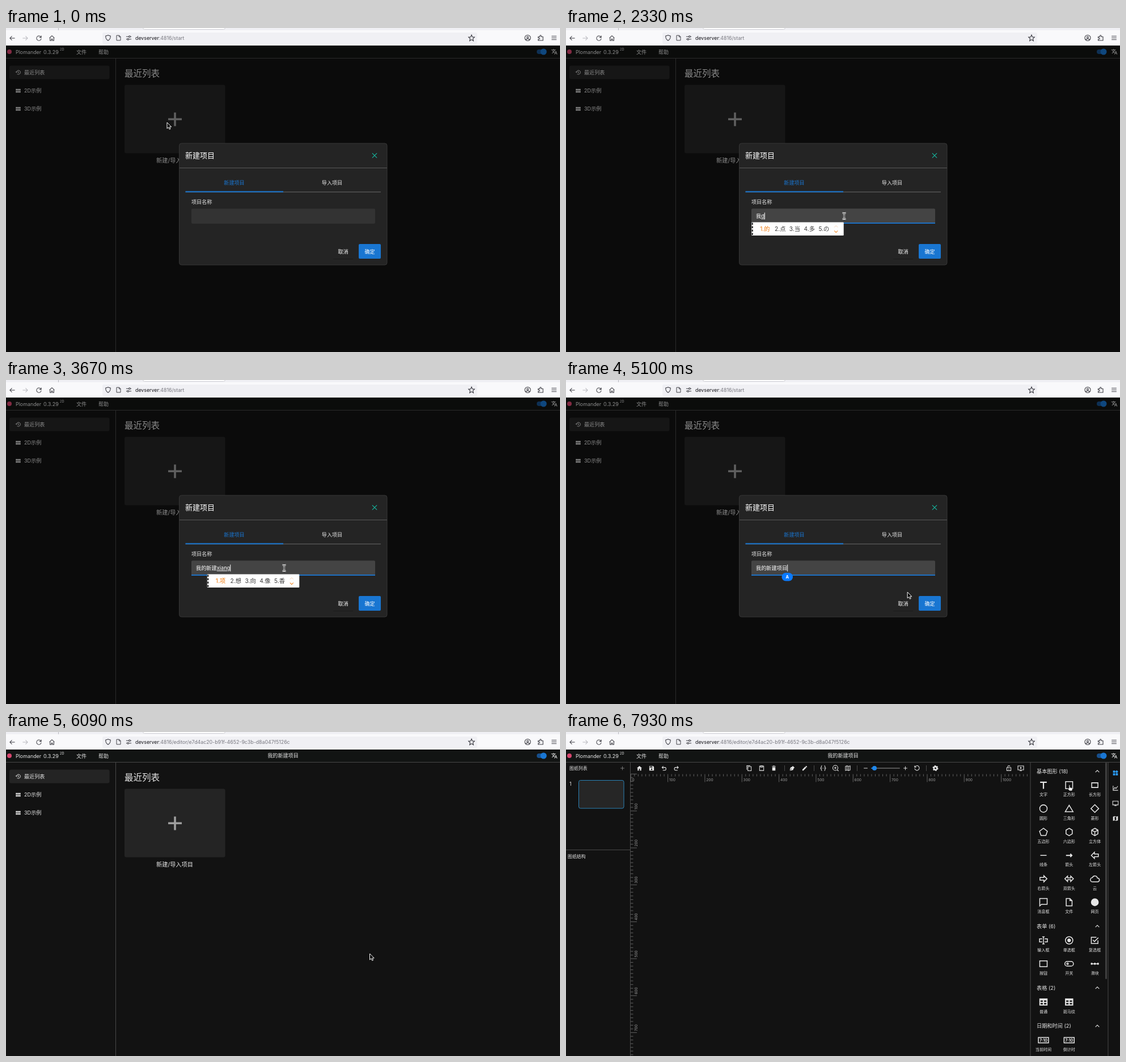
An HTML page for the animation above (8000 ms loop, 977 by 573 pixels).

```html
<!DOCTYPE html>
<html lang="zh-CN">
<head>
<meta charset="utf-8">
<title>Editor demo</title>
<style>
html, body { margin: 0; width: 100%; height: 100%; overflow: hidden; background: #121212; }
svg { display: block; width: 100%; height: 100%; }
text { font-family: Inter, "Noto Sans CJK SC", "Noto Sans CJK", sans-serif; white-space: pre; }
</style>
</head>
<body>
<svg viewBox="0 0 977 573" xmlns="http://www.w3.org/2000/svg"></svg>
<script>
const LOOP = 8000;
const WHITE = '#e6e6e6', BLUE = '#1976d2', PANEL = '#242424', RULE = '#484848';

// Drawing helpers: text is placed by its vertical centre, icons by their middle on a 24 unit grid.
const text = (x, cy, s, size = 9.1, fill = WHITE, extra = '') =>
  `<text x="${x}" y="${cy + size * .37}" font-size="${size}" fill="${fill}" ${extra}>${s}</text>`;
const mid = (x, cy, s, size, fill) => text(x, cy, s, size, fill, 'text-anchor="middle"');
const rect = (x, y, w, h, fill, r = 0, extra = '') =>
  `<rect x="${x}" y="${y}" width="${w}" height="${h}" rx="${r}" fill="${fill}" ${extra}/>`;
const dot = (x, y, r, fill) => `<circle cx="${x}" cy="${y}" r="${r}" fill="${fill}"/>`;
const place = (x, y, size) => `transform="translate(${x - size / 2} ${y - size / 2}) scale(${size / 24})"`;
const line = (x, y, size, d, color = WHITE, w = 2.2) =>
  `<path ${place(x, y, size)} d="${d}" fill="none" stroke="${color}" stroke-width="${w}"/>`;
const solid = (x, y, size, d, color = WHITE) =>
  `<path ${place(x, y, size)} d="${d}" fill="${color}" fill-rule="evenodd"/>`;
const group = (id, body, extra = '') => `<g id="${id}" ${extra}>${body}</g>`;
const ring = (cx, cy, r) => `M${cx - r} ${cy}a${r} ${r} 0 1 0 ${2 * r} 0a${r} ${r} 0 1 0 ${-2 * r} 0z`;

const MAP = 'M3 5l6-2 6 2 6-2v16l-6 2-6-2-6 2zM9 3v16M15 5v16';
const HOUSE = 'M3 11l9-8 9 8M5 10v11h5v-6h4v6h5V10';
const MONITOR = 'M2 4h20v14H2zM8 21h8';

function browser() {
  const ink = '#3b3b42';
  return rect(0, 0, 977, 31, '#f9f9fb') + rect(0, 0, 977, 4, '#f0f0f4') +
    rect(92, 0, 1, 4, '#b9b9c0') +
    rect(241.5, -6, 145, 8.5, '#fff', 3, 'stroke="#c4c4cb" stroke-width=".8"') +
    rect(170, 8, 661, 20, '#f0f0f4', 3) +
    line(11, 18, 11, 'M22 12H3M11 4l-8 8 8 8', ink) +
    line(34, 18, 11, 'M2 12h19M13 4l8 8-8 8', '#b8b8be') +
    line(58, 18, 11, 'M20 8a9 9 0 1 0 1 5M21 2v7h-7', ink) +
    line(81, 18, 11.5, HOUSE, ink) +
    line(180, 17.5, 11.5, 'M12 2l9 3c0 8-2 13-9 17C5 18 3 13 3 5z', ink) +
    line(198.5, 17.5, 10.5, 'M4 2h11l5 5v15H4zM14 2v6h6', ink) +
    line(216.5, 17.5, 11, 'M2 7h10M18 7h4M2 17h4M12 17h10' + ring(15, 7, 3) + ring(9, 17, 3), ink) +
    line(821, 17.5, 12.5, 'M12 2l3 7 7 .7-5.300 4.900 1.600 7.400-6.300-4-6.300 4 1.600-7.400L2 9.700 9 9z', ink) +
    line(920, 17.5, 12, ring(12, 12, 10) + ring(12, 9.5, 3) + 'M6 19c1-5 11-5 12 0', ink) +
    line(943, 17.5, 12, 'M3 8h6V5a2.500 2.500 0 0 1 5 0v3h6v13H3v-4h3a2.500 2.500 0 0 0 0-5H3z', ink) +
    line(966.5, 17.5, 10.5, 'M2 5h20M2 12h20M2 19h20', ink) +
    `<text x="228" y="21" font-size="8.8" fill="#77777f"><tspan fill="#15141a">devserver</tspan><tspan id="url"></tspan></text>`;
}

function header() {
  const translate = 'M12.870 15.070l-2.540-2.510c1.770-1.970 3-4.200 3.740-6.560H17V4h-7V2H8v2H1v2h11.170' +
    'C11.500 7.920 10.440 9.750 9 11.350 8.070 10.320 7.300 9.190 6.690 8h-2c.730 1.630 1.730 3.170 2.980 4.560' +
    'L2.580 17.580 4 19l5-5 3.110 3.110zM18.500 10h-2L12 22h2l1.120-3h4.750L21 22h2zm-2.620 7l1.620-4.330L19.120 17z';
  return rect(0, 31, 977, 22, '#121413') + rect(0, 53, 977, 1, RULE) +
    dot(6, 42, 4, '#d8466e') +
    text(17, 42.5, 'Plomander', 8.9) + text(66, 42.5, '0.3.29', 9) + text(95, 38, '2D', 5.6) +
    text(124, 42.5, '文件') + text(163, 42.5, '帮助') +
    rect(936, 38, 14, 8, '#174f8c', 4) + dot(948, 42, 5.5, BLUE) +
    solid(967, 42, 11.5, translate) +
    group('title', mid(488.5, 41.5, '我的新建项目', 9.1));
}

function listPage() {
  const cells = 'M2 4h6v7H2zM9 4h6v7H9zM16 4h6v7h-6zM2 13h6v7H2zM9 13h6v7H9zM16 13h6v7h-6z';
  return rect(0, 54, 977, 519, '#121212') + rect(193, 54, 1, 519, RULE) +
    rect(6, 66.5, 176.5, 24, PANEL, 3) +
    line(21.5, 78.5, 10, 'M4.500 12a8.500 8.500 0 1 1 2.500 6M1 9l3.500 4L8 9M12.500 7v6l4 2') +
    text(32, 79, '最近列表') +
    solid(21.5, 111, 10, cells) + text(32, 111, '2D示例') +
    solid(21.5, 143, 10, cells) + text(32, 143, '3D示例') +
    text(209, 80, '最近列表', 15.5) +
    rect(209, 100.5, 177.5, 121, PANEL, 3) +
    rect(286, 159.5, 24, 3.6, '#9e9e9e') + rect(296.2, 149.5, 3.6, 24, '#9e9e9e') +
    mid(297.5, 234, '新建/导入项目', 10.2);
}

function dialog() {
  return rect(305.5, 204, 366.5, 215, PANEL, 4, 'stroke="#363636"') +
    text(316, 225, '新建项目', 13, '#fff') +
    line(650, 225.5, 11, 'M3 3l18 18M21 3L3 21', '#16b39b', 2.6) +
    rect(306, 247, 366, 1, '#595959') +
    mid(402.5, 274, '新建项目', 9.1, BLUE) + mid(575, 274, '导入项目', 9.1) +
    rect(316.5, 289.5, 344.5, 1, '#6a6a6a') + rect(316.5, 288.5, 172.5, 2, BLUE) +
    text(327, 308, '项目名称') +
    rect(327, 319.5, 324, 26.5, '#333', 2) +
    group('glow', rect(327, 319.5, 324, 26.5, '#444', 2)) +
    rect(327, 344.2, 324, 1.8, BLUE, 0, 'id="underline"') +
    `<text id="field" x="335" y="336" font-size="9.2" fill="#fff"><tspan></tspan><tspan text-decoration="underline"></tspan></text>` +
    rect(0, 326.5, 1, 12, '#fff', 0, 'id="caret"') +
    rect(577, 408, 35, 1, '#1b1b1b') + mid(594.5, 395.5, '取消', 9.1, '#fff') +
    rect(622, 382, 39, 26, BLUE, 2) + mid(641.5, 395.5, '确定', 9.1, '#fff') +
    group('badge', rect(380.5, 341, 19.5, 14.500, '#0a7aff', 7) +
      text(390.2, 348.2, 'A', 7.5, '#fff', 'text-anchor="middle" font-weight="700"')) +
    '<g id="popup"></g>';
}

function rulers() {
  const step = 6.533, x0 = 114.3, y0 = 74.3;
  let out = '', ticks = '';
  for (let i = 0; i < 108; i++) {
    const major = i % 10 === 0, x = x0 + i * step, y = y0 + i * step;
    if (x < 819) {
      ticks += `M${x} 74.500v${major ? 14 : 4}`;
      if (major) out += text(x + 2.3, 84.5, i * 10, 6.6, '#999');
    }
    if (y < 573) {
      ticks += `M114 ${y}h${major ? 11 : 4.5}`;
      if (major && i) out += text(0, 0, i * 10, 6.6, '#999', `transform="translate(123.5 ${y - 2.5}) rotate(-90)"`);
    }
  }
  return out + `<path d="${ticks}" stroke="#777" stroke-width=".8"/>`;
}

function toolbar() {
  const y = 64, s = 11, undo = 'M7 20h7a5.500 5.500 0 0 0 0-11H4M9 4L4 9l5 5';
  return solid(129.5, y, s, 'M10 21v-7h4v7h5v-9h3L12 3 2 12h3v9z') +
    solid(151, y, s, 'M17 3H3v18h18V7zM5 5h10v4H5z' + ring(12, 16, 3)) +
    line(173, y, s, undo) +
    `<g transform="translate(367.500 0) scale(-1 1)">${line(173, y, s, undo)}</g>` +
    line(323, y, s, 'M3 18V2h13M7 6h13v16H7z') +
    line(345, y, s, 'M4 4h16v17H4zM8 3h8v5H8z') +
    solid(366.5, y, s, 'M6 8h12v13H6zM19 4h-4l-1-2h-4L9 4H5v2h14z') +
    solid(399, y, s, 'M14 3l7 7-3 2-3 7-12 3 7-8-1-1-7 8 3-11 7-4z') +
    solid(421, y, s, 'M3 17v4h4L18 10l-4-4zM20.700 7c.500-.500.500-1 0-1.400l-2.300-2.300c-.400-.400-1-.400-1.400 0L15 5l4 4z') +
    line(453.5, y, 12, 'M8 3C4 3 6 8 5 10q-1 2-3 2 2 0 3 2c1 2-1 7 3 7M16 3c4 0 2 5 3 7q1 2 3 2-2 0-3 2c-1 2 1 7-3 7M8 12h2M14 12h2') +
    line(475.5, y, 12, ring(11, 11, 9) + 'M11 7v8M7 11h8M17 17l5 5') +
    line(497, y, s, MAP) +
    [385, 437, 513, 635].map(x => rect(x, 59, 1, 10, '#4a4a4a')).join('') +
    line(528.5, y, 10, 'M4 12h16') +
    rect(538, 63, 51, 2, '#555', 1) + rect(538, 63, 6, 2, BLUE, 1) + dot(544, 64, 4, '#1f87ea') +
    line(598.5, y, 10, 'M4 12h16M12 4v16') +
    line(619, y, s, 'M4 7a9 9 0 1 1-1 6M3 2v6h6') +
    `<g ${place(651.5, y, s)} fill="none" stroke="${WHITE}"><circle cx="12" cy="12" r="6" stroke-width="5"/>` +
    `<circle cx="12" cy="12" r="9.500" stroke-width="3" stroke-dasharray="5 4.950"/></g>` +
    line(781, y, s, 'M4 10h16v11H4zM8 10V6a4 4 0 0 1 8 0M12 14v3') +
    line(802, y, 12, MONITOR) + solid(802, y, 12, 'M10 7l6 4-6 4z');
}

const hexagon = 'M12 2.500l8 4.700v9.600l-8 4.700-8-4.700V7.200z';
const table = 'M3 4.500h18v15H3zM3 6.500h18M3 13h18M12 8v11';
const clock = 'M-1 5h26v14H-1z';
const sections = [
  ['基本图形 (18)', 69.5, 94, [
    ['文字', 'M3.500 4.500h17M12 4.500v17', 3.2], ['正方形', 'M3 3h18v18H3z'], ['长方形', 'M4 6h16v12H4z'],
    ['圆形', ring(12, 12, 9.5)], ['三角形', 'M12 3.500L2 20h20z'], ['菱形', 'M12 2L22 12 12 22 2 12z'],
    ['五边形', 'M12 2.500L2 10l3.800 11h12.400L22 10z'], ['六边形', hexagon], ['立方体', hexagon + 'M4 7.200l8 4.600 8-4.600M12 12v9.500'],
    ['线条', 'M4 12h16'], ['箭头', 'M4 12h15M15 8l4 4-4 4', 2.8], ['左箭头', 'M11 4v4.500h10v7H11V20l-8-8z'],
    ['右箭头', 'M13 4v4.500H3v7h10V20l8-8z'], ['双箭头', 'M8 5v4.500h8V5l7 7-7 7v-4.500H8V19l-7-7z'],
    ['云', 'M6.500 20a5.500 5.500 0 0 1-.600-11A6.500 6.500 0 0 1 18.500 10a5 5 0 0 1 .500 10z'],
    ['消息框', 'M2.500 2.500h19v15H7l-4.500 4z'], ['文件', 'M4.500 2.500h9.500l5.500 5.500v13.500h-15zM14 3v5h5'], ['网页', ring(12, 12, 5), 10]]],
  ['表单 (6)', 343.5, 368.5, [
    ['输入框', 'M9 8H2v8h7M15 8h7v8h-7M12 3v18M9 3h6M9 21h6'], ['单选框', ring(12, 12, 9.5) + ring(12, 12, 3.5) + ring(12, 12, 1.5)],
    ['复选框', 'M20 12v8H3V4h13M7 11l4 4L21 5'],
    ['按钮', 'M2.500 4.500h19v15h-19z'], ['开关', 'M7 6h10a6 6 0 0 1 0 12H7A6 6 0 0 1 7 6z' + ring(8, 12, 2)],
    ['滑块', 'M3 12h18' + [4, 12, 20].map(x => ring(x, 12, 1.5)).join('')]]],
  ['表格 (2)', 452.5, 477.5, [['普通', table, 3], ['斑马纹', table, 3]]],
  ['日期和时间 (2)', 520, 545, [['当前时间', clock], ['倒计时', clock]]],
];

function palette() {
  return sections.map(([name, y, first, items]) =>
    text(830, y, name, 9.2) + line(937, y, 10, 'M4 16l8-8 8 8', WHITE, 2.5) +
    items.map(([label, d, w], i) => {
      const x = 842 + i % 3 * 45.3, cy = first + Math.floor(i / 3) * 41.4;
      return line(x, cy, 16.5, d, WHITE, w) + mid(x, cy + 16.6, label, 7.1) +
        (d === clock ? text(x, cy, '7:10', 7, WHITE, 'text-anchor="middle" font-weight="700"') : '');
    }).join('')).join('') +
    line(969, 99, 11, 'M3 3v18h19M5 17l5-7 4 4 7-9') +
    line(969, 126, 11.5, MONITOR) +
    solid(969, 153, 11.5, 'M3 5l6-2 6 2 6-2v16l-6 2-6-2-6 2zM9 5v12l6 2V7z') +
    solid(969, 72.5, 11.5, 'M13 13v8h8v-8zM3 21h8v-8H3zM3 3v8h8V3zM16.700 1.700L11 7.300l5.700 5.700 5.600-5.700z', '#2b9af3');
}

function editor() {
  return rect(0, 54, 977, 519, '#121212') +
    [[113, 54, 1, 519], [0, 208, 113, 1], [818.5, 54, 1, 519], [955.5, 54, 1, 519]]
      .map(box => rect(...box, RULE)).join('') +
    text(6, 64, '图纸列表', 7.9) + line(99.5, 64, 9, 'M3 12h18M12 3v18', '#8a8a8a') +
    text(6, 92, '1', 9) +
    rect(22.5, 85.5, 79.5, 49.5, '#262626', 3, 'stroke="#2a81b5"') +
    text(3, 220.5, '图纸结构', 7.9) +
    rulers() + toolbar() + group('palette', palette()) +
    rect(951, 54, 3, 383, '#8c8c8c', 1.5, 'id="scrollbar"');
}

const pointer = group('arrow', '<path d="M0 0v10.800l2.500-2.300 1.700 3.700 1.800-.800-1.700-3.500h3.400z" fill="#000" stroke="#fff"/>') +
  group('beam', ['#fff', '#222'].map((c, i) =>
    `<path d="M-3-5.500q3 0 3 2v7q0 2-3 2M3-5.500q-3 0-3 2v7q0 2 3 2M-1.500 0h3" fill="none" stroke="${c}" stroke-width="${i ? .8 : 2.4}"/>`).join('')) +
  group('hand', '<path d="M-1 0q1.200-.800 1.800.500v3.500l3.500.800q1 .300.900 1.500l-.700 3.700h-4.500L-3.200 6.500q0-1.500 2.200-.500z" fill="#fff" stroke="#222" stroke-width=".700"/>');

document.querySelector('svg').innerHTML =
  group('list', listPage()) + group('editor', editor()) + header() +
  rect(0, 31, 977, 542, '#000', 0, 'id="shade"') +
  browser() + group('dialog', dialog()) + group('cursor', pointer);

// Typing steps: time, committed text, letters being composed, candidates.
const typing = [
  [0, '', '', ''],
  [1690, '', 'w', '我 为 玩 完 万'],
  [1850, '', 'wo', '我 窝 握 卧 沃'],
  [2090, '我', '', ''],
  [2330, '我', 'd', '的 点 当 多 の'],
  [2500, '我的', '', ''],
  [2680, '我的', 'x', '下 小 想 新 像'],
  [2910, '我的', 'xi', '系 西 喜 洗 戏'],
  [3000, '我的', 'xin', '新 心 信 欣 辛'],
  [3120, '我的', 'xinji', '新机 心机 心急 心计 新季'],
  [3240, '我的', 'xinjian', '新建 心间 新键 心尖 新件'],
  [3390, '我的新建', '', ''],
  [3500, '我的新建', 'xi', '系 西 喜 洗 戏'],
  [3600, '我的新建', 'xian', '先 现 线 县 显'],
  [3670, '我的新建', 'xiang', '项 想 向 像 香'],
  [3780, '我的新建', 'xiangmu', '项目 相目 香木 项'],
  [3840, '我的新建项目', '', ''],
];
const path = [
  [0, 284, 167], [90, 284, 167], [270, 350, 205], [480, 472, 315], [630, 490.5, 332.5],
  [4480, 490.5, 332.5], [4700, 530, 342], [5100, 602, 375], [5380, 641.5, 392],
  [6500, 641.5, 392], [6760, 590, 350], [7020, 553, 288], [7090, 553, 288],
  [7300, 781, 190], [7480, 862, 132], [7700, 884, 102], [7930, 888, 94],
];

const $ = id => document.getElementById(id);
const clamp = v => Math.min(1, Math.max(0, v));
const ramp = (t, from, to) => { const p = clamp((t - from) / (to - from)); return p * p * (3 - 2 * p); };
const show = (id, on) => { $(id).style.display = on ? '' : 'none'; };
const fade = (id, v) => { $(id).style.opacity = v; };

function popup(left, words) {
  if (!words) return '';
  let x = 15, body = '';
  words.split(' ').forEach((word, i) => {
    body += text(x, 12.2, `${i + 1}.${word}`, 10.2, i ? '#3a3a3a' : '#f0790a');
    x += 15.6 + 10.2 * word.length;
  });
  return `<g transform="translate(${left} 343.500)">` + rect(0, 0, x + 18.5, 23.5, '#fff', 1) +
    '<path d="M1.500 1v22" stroke="#111" stroke-width="2" stroke-dasharray="3.500 2.500"/>' + body +
    line(x + 5, 7.5, 9, 'M4 16l8-8 8 8', '#f6cfae', 2.6) + line(x + 5, 16.5, 9, 'M4 8l8 8 8-8', '#f0790a', 2.8) + '</g>';
}

let lastStep = -1;
function drawTyping(t) {
  const step = typing.findLastIndex(s => s[0] <= t);
  if (step === lastStep) return;
  lastStep = step;
  const [, done, letters, words] = typing[step], field = $('field');
  field.children[0].textContent = done;
  field.children[1].textContent = letters;
  const width = done || letters ? field.getComputedTextLength() : 0;
  $('caret').setAttribute('x', 335 + width);
  $('popup').innerHTML = popup(318 + 9.2 * done.length, words);
}

function drawCursor(t) {
  const next = path.findIndex(p => p[0] > t), last = path.length - 1;
  const [t0, x0, y0] = path[next < 0 ? last : next - 1];
  const [t1, x1, y1] = path[next < 0 ? last : next];
  const p = t1 > t0 ? (t - t0) / (t1 - t0) : 0;
  const x = x0 + (x1 - x0) * p, y = y0 + (y1 - y0) * p;
  $('cursor').setAttribute('transform', `translate(${x} ${y})`);
  const beam = t < 5100 && x > 327 && y > 319.5 && y < 346;
  const hand = (t > 5250 && t < 5750) || t > 7480;
  show('beam', beam);
  show('hand', hand);
  show('arrow', !beam && !hand);
}

function draw(t) {
  const closing = ramp(t, 5560, 5840), created = t >= 5520, editing = t >= 6150;
  drawTyping(t);
  drawCursor(t);
  $('url').textContent = ':4816/' + (created ? 'editor/e7d4ac20-b91f-4652-9c3b-d8a047f5126c' : 'start');
  show('title', created);
  show('list', !editing);
  show('editor', editing);
  show('palette', t >= 6260);
  fade('shade', .4 * (1 - closing));
  fade('dialog', 1 - closing);
  fade('glow', ramp(t, 450, 640));
  const grow = ramp(t, 810, 1150);
  $('underline').setAttribute('x', 489 - 162 * grow);
  $('underline').setAttribute('width', 324 * grow);
  const blinkOff = (t >= 1390 && t < 1690) || (t >= 4170 && t < 4380);
  show('caret', t >= 850 && !blinkOff);
  show('badge', t >= 4350 && t < 5560);
  fade('scrollbar', .25 + .13 * ramp(t, 7150, 7450));
}

const start = performance.now();
function tick() {
  draw((performance.now() - start) % LOOP);
  requestAnimationFrame(tick);
}
tick();
</script>
</body>
</html>
```
